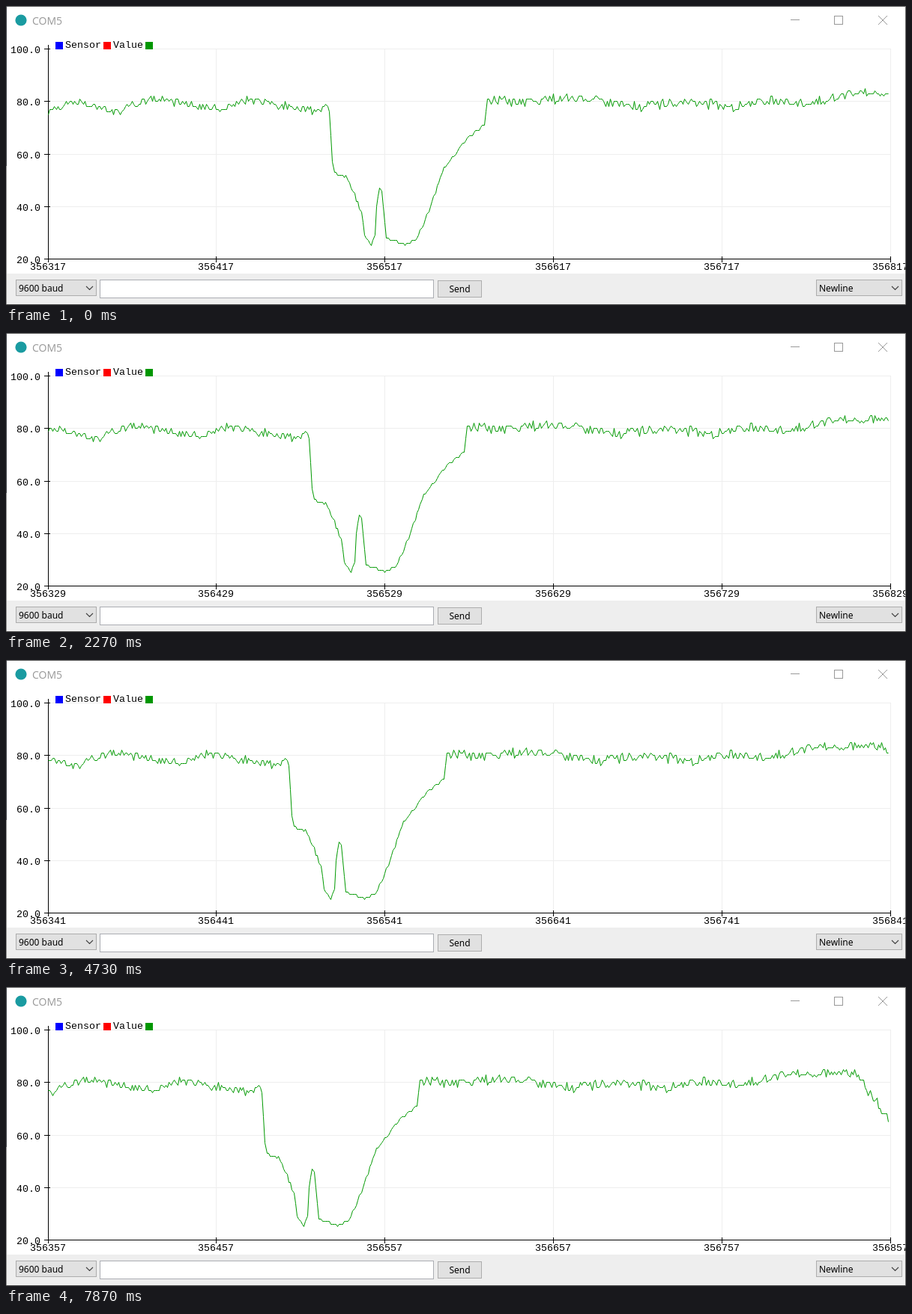
Recreate the animation shown at these times as an HTML page. Size 1201x400 px, loop 8000 ms.

```html
<!DOCTYPE html>
<html lang="en">
<head>
<meta charset="utf-8">
<title>Serial plotter</title>
<style>
  html, body { margin: 0; width: 100%; height: 100%; overflow: hidden; background: #fff; }
  svg { display: block; width: 1201px; height: 400px; }
  .mono { font: 13.33px "Liberation Mono", monospace; }
  .ui { font: 12px "Noto Sans", "Open Sans", sans-serif; }
  .title { font: 14px "Open Sans", "Noto Sans", sans-serif; fill: #999; }
  .crisp { shape-rendering: crispEdges; }
  .control { fill: #e1e1e1; stroke: #adadad; }
  .chevron { fill: none; stroke: #404040; stroke-width: 1.1; }
  .caption { fill: none; stroke: #999; }
  .trace { fill: none; stroke: #009900; stroke-linejoin: round; }
</style>
</head>
<body>
<svg viewBox="0 0 1201 400">
  <rect width="1201" height="400" fill="#fff"/>

  <circle cx="20" cy="19" r="7.6" fill="#1a9ba1"/>
  <text class="title" x="35" y="25">COM5</text>
  <g class="caption">
    <path class="crisp" d="M1047 18.5h12M1105.5 13.5h11v11h-11z"/>
    <path d="M1164 13l12 12M1176 13l-12 12"/>
  </g>

  <g id="plot"></g>
  <path id="trace" class="trace"/>
  <g class="crisp">
    <rect x="66" y="48" width="10" height="10" fill="#00f"/>
    <rect x="130" y="48" width="10" height="10" fill="#f00"/>
    <rect x="186" y="48" width="10" height="10" fill="#009600"/>
  </g>
  <text class="mono" x="79" y="56">Sensor</text>
  <text class="mono" x="143" y="56">Value</text>

  <rect y="358" width="1201" height="42" fill="#eee"/>
  <g class="crisp">
    <rect class="control" x="13.5" y="366.5" width="107" height="21"/>
    <rect x="125.5" y="366.5" width="445" height="24" fill="#fff" stroke="#abadb3"/>
    <rect class="control" x="576.5" y="367.5" width="58" height="22"/>
    <rect class="control" x="1081.5" y="366.5" width="114" height="21"/>
  </g>
  <path class="chevron" d="M107 375l4.5 4.5l4.5 -4.5M1182 375l4.5 4.5l4.5 -4.5"/>
  <text class="ui" x="17" y="382">9600 baud</text>
  <text class="ui" x="605.5" y="383" text-anchor="middle">Send</text>
  <text class="ui" x="1085" y="382">Newline</text>

  <g class="crisp">
    <rect width="1201" height="1" fill="#555"/>
    <rect width="1" height="214" fill="#3a3d42"/>
    <rect y="214" width="1" height="186" fill="#8a8a8a"/>
    <rect x="1200" width="1" height="400" fill="#666"/>
    <rect y="399" width="1201" height="1" fill="#444"/>
  </g>
</svg>
<script>
const LOOP = 8000, STEP = 200, FIRST = 70, DELAY = 60;
const LATE_STEPS = [17, 24, 29, 31];
const SHOWN = 500, TOTAL = 540, START_COUNT = 356317;
const LEFT = 56, RIGHT = 1180, TOP = 57, BOTTOM = 338;
const DIP_START = 166, DIP_END = 261;

// Turning points of the signal: [sample, value].
const turns = [
  [0, 76], [18, 80], [40, 76], [62, 81], [100, 77.4], [121, 80.6], [156, 76.6], [166, 78],
  [167, 76], [169, 57], [170, 53], [177, 51.5], [181, 46], [186, 38], [188, 29], [192, 25.5],
  [194, 29], [195, 40], [197, 47], [198, 46], [201, 28], [212, 25.3], [219, 28], [224, 35],
  [235, 54.5], [249, 66], [259, 71], [261, 81],
  [275, 79.8], [312, 81.4], [352, 78], [380, 80.6], [406, 77.7], [426, 80.6], [452, 79.3],
  [480, 83.6], [519, 83], [539, 66.5]
];

function seededRandom(seed) {
  return () => (seed = (seed * 16807) % 2147483647) / 2147483647;
}

function signalAt(i) {
  const k = Math.max(1, turns.findIndex(([at]) => at >= i));
  const [i0, v0] = turns[k - 1], [i1, v1] = turns[k];
  return v0 + (v1 - v0) * (i - i0) / (i1 - i0);
}

function noiseAt(i) {
  if (i < DIP_START) return 2.8;
  return i <= DIP_END ? 0.9 : 3.6;
}

const random = seededRandom(4711);
const samples = Array.from({ length: TOTAL }, (_, i) =>
  Math.round(signalAt(i) + (random() - 0.5) * noiseAt(i)));

// Whole-pixel positions, as the plotter draws them.
const xOf = i => Math.floor(LEFT + i * (RIGHT - LEFT) / SHOWN);
const yOf = v => Math.round(BOTTOM - (v - 20) * (BOTTOM - TOP) / 80);

const plot = document.getElementById("plot");
const trace = document.getElementById("trace");

function add(name, attributes, content = "") {
  const node = document.createElementNS("http://www.w3.org/2000/svg", name);
  for (const key in attributes) node.setAttribute(key, attributes[key]);
  node.textContent = content;
  return plot.appendChild(node);
}

const line = (x, y, width, height, fill) =>
  add("rect", { x, y, width, height, fill, class: "crisp" });
const label = (x, y, anchor, content) =>
  add("text", { x, y, "text-anchor": anchor, class: "mono" }, content);

const columns = [0, 100, 200, 300, 400, 500];
const rows = [20, 40, 60, 80, 100];

columns.slice(1).forEach(i => line(xOf(i), TOP, 1, BOTTOM - TOP, "#eee"));
rows.slice(1).forEach(v => line(LEFT, yOf(v), RIGHT - LEFT, 1, "#eee"));
line(LEFT, 52, 1, 291, "#000");
line(51, BOTTOM, RIGHT - 50, 1, "#000");
rows.forEach(v => {
  line(51, yOf(v), 8, 1, "#000");
  label(46, yOf(v) + 6, "end", v.toFixed(1));
});
const counters = columns.map(i => {
  line(xOf(i), 335, 1, 8, "#000");
  return label(xOf(i), 353, "middle", "");
});

function stepAt(time) {
  const elapsed = time + STEP - FIRST;
  const step = Math.floor(elapsed / STEP);
  const waiting = LATE_STEPS.includes(step) && elapsed % STEP < DELAY;
  return waiting ? step - 1 : step;
}

let shownStep = -1;
function show(step) {
  if (step === shownStep) return;
  shownStep = step;
  const points = samples.slice(step, step + SHOWN)
    .map((v, i) => `${xOf(i) + 0.5} ${yOf(v) + 0.5}`);
  trace.setAttribute("d", "M" + points.join("L"));
  counters.forEach((node, k) => node.textContent = START_COUNT + step + columns[k]);
}

const started = performance.now();
function tick() {
  show(stepAt((performance.now() - started) % LOOP));
  requestAnimationFrame(tick);
}
tick();
</script>
</body>
</html>
```
